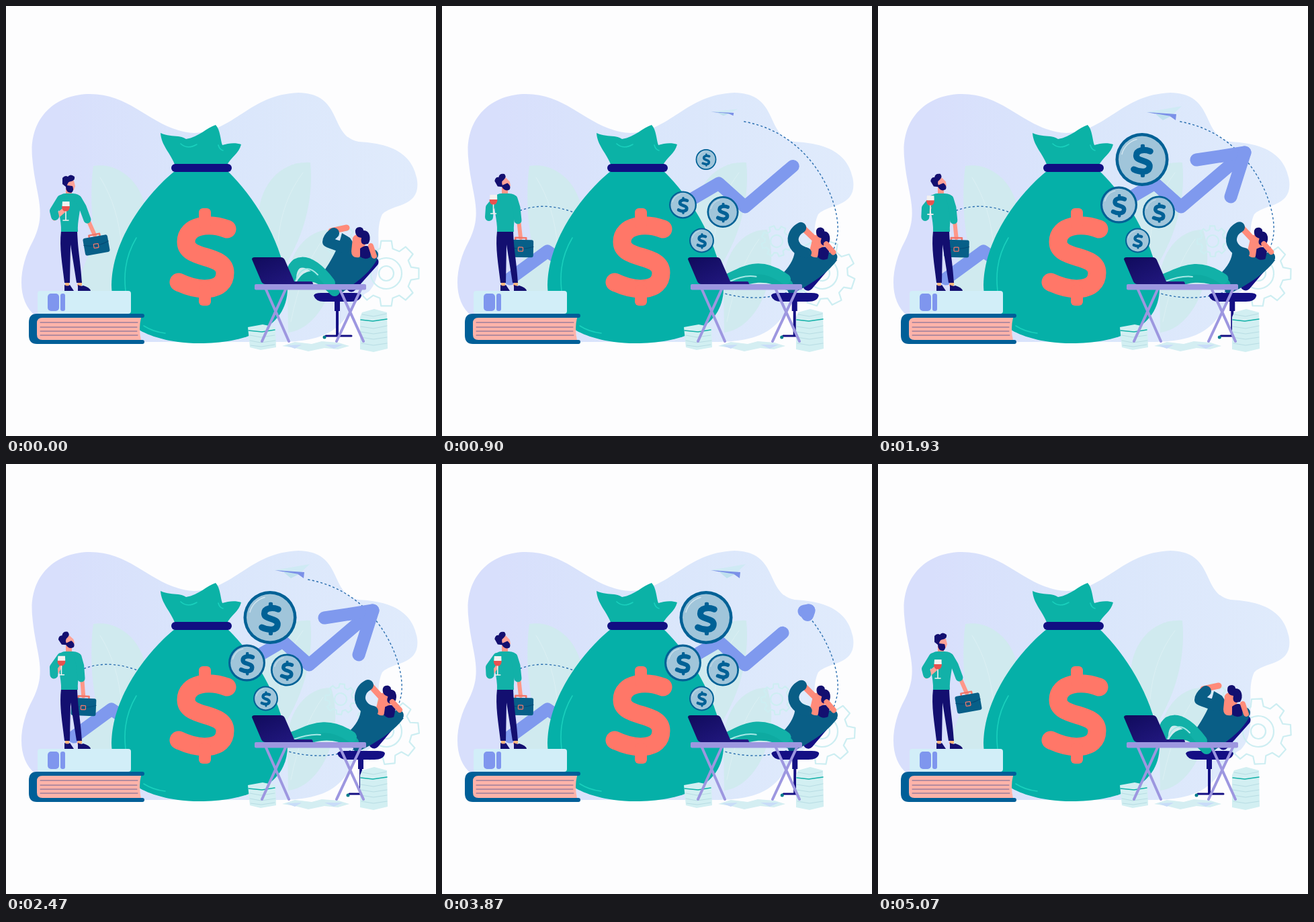
Write an HTML page that moves like this. It is 640 px wide and 640 px high and loops after 5110 ms.

```html
<!DOCTYPE html>
<html lang="en">
<head>
<meta charset="utf-8">
<title>Passive income</title>
<style>
html, body { margin: 0; width: 100%; height: 100%; overflow: hidden; background: #fdfdfe; }
svg { display: block; width: 100vw; height: 100vh; }
.line { fill: none; stroke-linecap: round; stroke-linejoin: round; }
</style>
</head>
<body>
<svg viewBox="0 0 640 640">
  <defs>
    <linearGradient id="sky"><stop offset=".1" stop-color="#d8dffc"/><stop offset=".5" stop-color="#dae6fb"/><stop offset="1" stop-color="#e0ebfc"/></linearGradient>
    <linearGradient id="screen" x2="1" y2="1"><stop stop-color="#100b5c"/><stop offset="1" stop-color="#251a86"/></linearGradient>
    <mask id="reveal" maskUnits="userSpaceOnUse" x="0" y="0" width="640" height="640">
      <path id="trailMask" class="line" stroke="#fff" stroke-width="8" pathLength="1"/>
    </mask>
    <g id="dollar">
      <path class="line" stroke-width="27" stroke-linecap="butt" d="M329 332C302 322 268 326 268 351C268 379 326 368 326 397C326 427 286 425 257 411"/>
      <rect x="287" y="301" width="18" height="30" rx="6" stroke="none"/>
      <rect x="287" y="416" width="18" height="30" rx="6" stroke="none"/>
    </g>
  </defs>

  <path fill="url(#sky)" d="M125 131C75 131 34 165 39 225C44 285 62 305 40 350C18 390 15 440 45 462L200 500H400C520 502 500 445 540 425C568 395 545 340 560 310C575 294 617 300 612 260C605 212 560 204 525 202C480 194 503 130 435 129C362 132 340 187 280 189C220 186 190 131 125 131Z"/>

  <g fill="#d0eaef">
    <path d="M130 238C165 232 198 258 207 298L160 425C125 370 124 280 130 238Z"/>
    <path d="M108 425C112 390 122 365 142 345L172 425Z"/>
    <path d="M453 233C412 230 380 262 376 308L413 390C445 340 458 285 453 233Z"/>
    <path d="M484 333C448 332 420 368 419 410L420 486C470 480 505 400 484 333Z"/>
  </g>
  <path class="line" stroke="#dcf0f4" d="M140 255Q168 300 172 360M442 248Q410 290 405 350M472 347Q440 390 424 470"/>

  <g class="line" stroke="#cdeef2" stroke-width="2.2">
    <g id="bigGear"></g>
    <g id="smallGear"></g>
  </g>

  <path id="trail" fill="none" stroke="#2b6fb0" stroke-width="1.4" stroke-dasharray="3.2 3.2" mask="url(#reveal)"/>
  <g class="line" stroke="#7f99ee" stroke-width="19">
    <path id="arrow" pathLength="1" d="M101 406L157 365L205 398L330 312L412 264L451 299L545 219"/>
    <path id="barbA" pathLength="1" d="M546 218L474 229"/>
    <path id="barbB" pathLength="1" d="M546 218L525 284"/>
  </g>
  <g id="plane">
    <path fill="#cfeaf4" d="M400 158L452 149L437 163Z"/>
    <path fill="#7b90e8" d="M400 158L444 161L443 170L436 165Z"/>
    <path fill="#bfe0ee" d="M412 160L436 164L424 170Z"/>
  </g>

  <g id="bag">
    <path fill="#05b0a8" d="M252 245C212 277 158 345 157 415C157 482 230 502 288 502C352 502 419 482 419 420C412 350 368 282 329 245Z"/>
    <path fill="#0bb2a6" d="M230 189C245 196 258 191 268 198C287 195 299 181 312 177C319 184 319 199 322 207C331 204 342 203 350 206C347 219 335 225 328 238H252C246 220 231 208 230 189Z"/>
    <rect x="246" y="235" width="90" height="12" rx="6" fill="#110f82"/>
    <g class="line" stroke="#1ad0bd" stroke-width="1.6">
      <path d="M194 345C176 375 174 405 180 437M205 476Q219 485 237 487M260 205Q270 214 284 206M316 207Q318 214 323 215"/>
    </g>
    <use href="#dollar" stroke="#ff7768" fill="#ff7768"/>
  </g>
  <g id="coins"></g>

  <g id="books">
    <rect x="47" y="424" width="139" height="34" rx="4" fill="#d2eef8"/>
    <rect x="62" y="428" width="17" height="26" rx="5" fill="#7f96ee"/>
    <rect x="81" y="428" width="7" height="26" rx="3" fill="#7f96ee"/>
    <path fill="#005f98" d="M46 458H203Q206 458 206 461T203 464H190V497H203Q206 497 206 500T203 503H46Q34 503 34 490V471Q34 458 46 458Z"/>
    <path fill="#ffb3a9" d="M54 464H201Q197 480 201 497H54Q46 497 46 489V472Q46 464 54 464Z"/>
    <path class="line" stroke="#585a92" stroke-width=".9" d="M51 471H196M51 478H195M51 484H195M51 490H196"/>
  </g>

  <g id="standing">
    <path id="foreSkin" class="line" stroke="#ff9788" stroke-width="6"/>
    <g id="case">
      <path class="line" stroke="#f0766a" stroke-width="2.5" d="M-8 -12V-16H8V-12"/>
      <rect x="-18" y="-13" width="37" height="26" rx="3" fill="#075f88"/>
      <path class="line" stroke="#044a75" d="M-18 -3Q0 4 19 -3"/>
      <rect x="-3.5" y="-2" width="7" height="6" rx="1" fill="none" stroke="#f0766a" stroke-width="1.3"/>
    </g>
    <path fill="#ffa398" d="M88 413H94V417H88ZM106 413H112V417H106Z"/>
    <path fill="#f7b77c" d="M88 410H94V416H88ZM107 410H113V416H107Z"/>
    <path fill="#130f70" d="M82 335H106C107 365 111 380 113 412H105L96 355L95 412H87C84 385 79 360 82 335ZM87 424V415Q92 418 95 415L101 424ZM107 424V415Q112 418 115 416Q125 419 126 424Z"/>
    <path fill="#ff9788" d="M89 270H98V282H89Z"/>
    <path fill="#12b1a8" d="M79 284Q82 279 89 279H99Q109 279 112 286C111 305 106 320 107 336H82C83 318 75 300 79 284Z"/>
    <path id="foreSleeve" class="line" stroke="#12b1a8" stroke-width="11"/>
    <g id="head">
      <path fill="#ffa398" d="M90 260H101L103 268L101 274H91Z"/>
      <path fill="#130f70" d="M84 256Q88 251 92 254Q96 249 102 254Q103 260 97 261Q92 261 91 267L99 268Q102 275 97 278Q89 278 89 269L84 265Z"/>
    </g>
    <path id="glassSkin" class="line" stroke="#ffa398" stroke-width="7"/>
    <path id="glassSleeve" class="line" stroke="#12b1a8" stroke-width="12"/>
    <g id="glass">
      <path fill="#f3f1f0" d="M-5 -9H5.5Q7 4 0 6Q-7 4 -5 -9Z"/>
      <path fill="#e8524f" d="M-6 -2H6Q6 5 0 6Q-6 5 -6 -2Z"/>
      <path class="line" stroke="#f3f1f0" stroke-width="1.6" d="M0 6V18M-4 19H4"/>
    </g>
  </g>

  <g id="paperFloor">
    <path fill="#d4eef2" d="M411 506L430 500L455 503L470 499L495 501L511 506L494 511L474 509L450 514L430 509Z"/>
    <path fill="#c8dcf8" d="M417 505L440 504L430 510ZM474 504L501 504L488 510Z"/>
  </g>

  <g id="seated">
    <path id="chairBack" class="line" stroke="#140f84" stroke-width="15"/>
    <path id="farSleeve" class="line" stroke="#095e86" stroke-width="16"/>
    <path id="torso" fill="#095e86"/>
    <g id="chair">
      <path fill="#140f84" d="M458 431Q459 427 469 427H518Q529 427 529 431Q527 440 513 440H473Q461 440 458 431Z"/>
      <path class="line" stroke="#140f84" d="M493 440V490" stroke-width="4"/>
      <path fill="#140f84" d="M489 440H497V454H489Z"/>
      <path class="line" stroke="#140f84" d="M476 491H514" stroke-width="3"/>
      <circle cx="474" cy="493" r="2.5" fill="#007d8d"/>
    </g>
    <g id="boss">
      <path fill="#ff8b7a" d="M516 345Q520 338 528 342L535 355L526 374Q514 376 514 365Z"/>
      <path fill="#130f70" d="M520 337Q519 329 527 329Q532 330 532 334Q539 334 541 341Q543 348 539 354L533 355Q527 354 529 345Q521 344 520 337ZM527 361Q537 353 543 361L542 374Q534 379 527 373Z"/>
    </g>
    <path id="farSkin" class="line" stroke="#ff8b7a" stroke-width="8"/>
    <path id="nearSkin" class="line" stroke="#ff8b7a" stroke-width="9"/>
    <path id="nearSleeve" class="line" stroke="#095e86" stroke-width="16"/>
    <path id="legFar" class="line" stroke="#0eaaa1" stroke-width="16"/>
    <path id="legNear" class="line" stroke="#12b1a8" stroke-width="16"/>
    <path id="legShine" class="line" stroke="#a5e8e6" stroke-width="2"/>
  </g>

  <g id="stacks">
    <path fill="#d2eff2" d="M360 478L382 474L401 478L402 508L379 512L363 508Z"/>
    <path fill="#d2eff2" d="M527 463L530 456L548 451L567 456L568 510L547 515L527 511Z"/>
    <path class="line" stroke="#b8dde4" d="M363 490L379 493L400 490M363 498L379 501L401 498M364 505L380 507L400 504M528 477L547 480L567 476M528 485L547 488L567 485M528 493L547 496L567 493M529 502L547 505L567 502M530 459L547 462L566 458"/>
    <path class="line" stroke="#12b1a8" stroke-width="1.6" d="M361 483L381 485L400 482M528 467L546 469L567 466"/>
  </g>

  <g id="desk">
    <path class="line" stroke="#9d97e0" stroke-width="4" d="M416 422L381 499M387 422L421 499M528 422L492 499M497 422L532 499"/>
    <rect x="370" y="414" width="166" height="8.5" rx="2" fill="#9d97e0"/>
    <path fill="url(#screen)" d="M366 377Q366 374 370 374H409Q413 374 415 378L429 410H455Q457 411 457 414H386Q382 414 380 410Z"/>
  </g>
</svg>

<script>
const LOOP = 5110;
const $ = id => document.getElementById(id);
const clamp = v => Math.min(1, Math.max(0, v));
const smooth = v => v * v * (3 - 2 * v);
const set = (id, name, value) => $(id).setAttribute(name, value);

// Eased value at time t through [time, value] pairs.
function key(t, ...pairs) {
  if (t <= pairs[0][0]) return pairs[0][1];
  for (let i = 1; i < pairs.length; i++) {
    const [t0, a] = pairs[i - 1], [t1, b] = pairs[i];
    if (t <= t1) return a + (b - a) * smooth((t - t0) / (t1 - t0));
  }
  return pairs.at(-1)[1];
}

// Blend two paths of the same structure.
function morph(a, b, p) {
  const to = b.match(/-?[\d.]+/g);
  let i = 0;
  return a.replace(/-?[\d.]+/g, v => (+v + (to[i++] - v) * p).toFixed(2));
}

function gearPath(teeth, outer, inner) {
  const points = [];
  const step = 2 * Math.PI / teeth;
  for (let i = 0; i < teeth; i++) {
    for (const [offset, r] of [[-.32, inner], [-.2, outer], [.2, outer], [.32, inner]]) {
      const a = (i + offset) * step;
      points.push(`${(r * Math.cos(a)).toFixed(1)} ${(r * Math.sin(a)).toFixed(1)}`);
    }
  }
  return `<path d="M${points.join('L')}Z"/>`;
}

const coins = [
  { x: 386.5, y: 349, r: 18.5 },
  { x: 418, y: 306.5, r: 24 },
  { x: 358.5, y: 296, r: 27.5 },
  { x: 393, y: 228.5, r: 39.5 }
];
const COIN_TIME = 500, COIN_GAP = 122, COINS_IN = 322, COINS_OUT = 4003;

const seatedPoses = {
  chairBack: ['M547 381L514 418', 'M580 378L548 416'],
  farSleeve: ['M533 384L546 370', 'M566 386L584 374'],
  torso: ['M500 338C496 355 488 375 468 402L494 431C520 412 540 400 553 376C535 378 525 365 512 345Z',
          'M526 352C532 370 525 385 507 402L520 430C545 418 574 402 592 378C577 378 562 370 548 362Z'],
  farSkin: ['M548 372L543 357', 'M586 366L575 354'],
  nearSkin: ['M484 335L507 330', 'M541 328L560 349'],
  nearSleeve: ['M504 360C492 356 484 354 479 351C479 347 483 342 488 338',
               'M546 368C534 366 526 356 527 346C528 338 533 332 539 329'],
  legFar: ['M440 414C450 396 465 400 489 424', 'M430 414C458 405 482 396 517 414'],
  legNear: ['M424 409C423 374 450 370 482 412', 'M422 408C452 398 474 379 514 406'],
  legShine: ['M431 410C437 390 450 385 464 400', 'M428 410C444 404 456 402 468 403']
};

const standingPoses = {
  foreSkin: ['M121 316L132 341', 'M114 318L117 345'],
  foreSleeve: ['M107 287L114 299L121 318', 'M107 287L111 300L113 319']
};
const glassPoses = {
  glassSkin: ['M72 316L85 305', 'M70 316L75 299'],
  glassSleeve: ['M82 287L71 305L73 313', 'M82 287L71 300L70 314']
};

const trail = 'M110 307Q150 289 198 308C300 335 330 390 414 426C490 450 572 420 588 345C597 300 555 190 449 172';
set('trail', 'd', trail);
set('trailMask', 'd', trail);
$('bigGear').innerHTML = gearPath(8, 49, 38) + '<circle r="23"/><circle r="11"/>';
$('smallGear').innerHTML = gearPath(8, 23, 17.5) + '<circle r="9"/>';
$('coins').innerHTML = coins.map(() => `<g>
  <circle r="39.5" fill="#006196"/><circle r="35" fill="#a0c5da"/>
  <path class="line" stroke="#d2e5ef" stroke-width="1.5" d="M-30 -8A31 31 0 0 1 -8 -30"/>
  <use href="#dollar" stroke="#006196" fill="#006196" transform="translate(1 2) scale(.34) translate(-296 -374)"/>
</g>`).join('');

function drawLine(id, amount) {
  set(id, 'stroke-dasharray', `${amount} 2`);
  set(id, 'visibility', amount > .001 ? 'visible' : 'hidden');
}

function applyPoses(poses, p) {
  for (const id in poses) set(id, 'd', morph(...poses[id], p));
}

function render(t) {
  const lean = key(t, [0, 0], [600, .9], [2470, 1], [3230, .94], [3800, .93], [5080, 0]);
  applyPoses(seatedPoses, lean);
  set('chair', 'transform', `translate(${35 * lean} 0)`);
  set('boss', 'transform', `translate(${38 * lean} ${lean}) rotate(${8 * lean} 530 355)`);

  const stand = key(t, [0, 0], [520, 1], [1700, 1], [2470, 1.12], [3200, 1], [4350, 1], [5060, 0]);
  applyPoses(standingPoses, stand);
  set('case', 'transform', `translate(${134 - 17 * stand} ${356 + 5 * stand}) rotate(${-10 + 11 * stand})`);
  set('head', 'transform', `translate(${-stand} ${-2 * stand}) rotate(${-30 * stand} 94 268)`);

  const sip = key(t, [0, 0], [520, 1], [1630, 1], [2600, .5], [4350, .5], [5060, 0]);
  applyPoses(glassPoses, sip);
  set('glass', 'transform', `translate(${89 - 12.5 * sip} ${300 - 10 * sip})`);

  drawLine('trailMask', key(t, [0, 0], [715, 1], [3750, 1], [4290, 0]));
  drawLine('arrow', key(t, [300, 0], [1000, 1], [3780, 1], [4270, 0]));
  const barb = key(t, [900, 0], [1150, 1], [3750, 1], [3900, 0]);
  drawLine('barbA', barb);
  drawLine('barbB', barb);

  const fly = key(t, [560, 0], [1050, 1], [3950, 1], [4600, 0]);
  set('plane', 'transform', `translate(400 157) scale(${fly} ${fly ** 3}) translate(-400 -157)`);

  coins.forEach(({ x, y, r }, i) => {
    const grow = smooth(clamp((t - COINS_IN - i * COIN_GAP) / COIN_TIME));
    const shrink = smooth(clamp((t - COINS_OUT - i * COIN_GAP) / COIN_TIME));
    $('coins').children[i].setAttribute('transform',
      `translate(${x} ${y}) scale(${(grow - shrink) * r / 39.5})`);
  });

  const turn = 360 * t / LOOP;
  set('bigGear', 'transform', `translate(566 398) rotate(${turn})`);
  set('smallGear', 'transform', `translate(498 350) rotate(${-turn})`);
}

const began = performance.now();
function tick() {
  render((performance.now() - began) % LOOP);
  requestAnimationFrame(tick);
}
tick();
</script>
</body>
</html>
```
